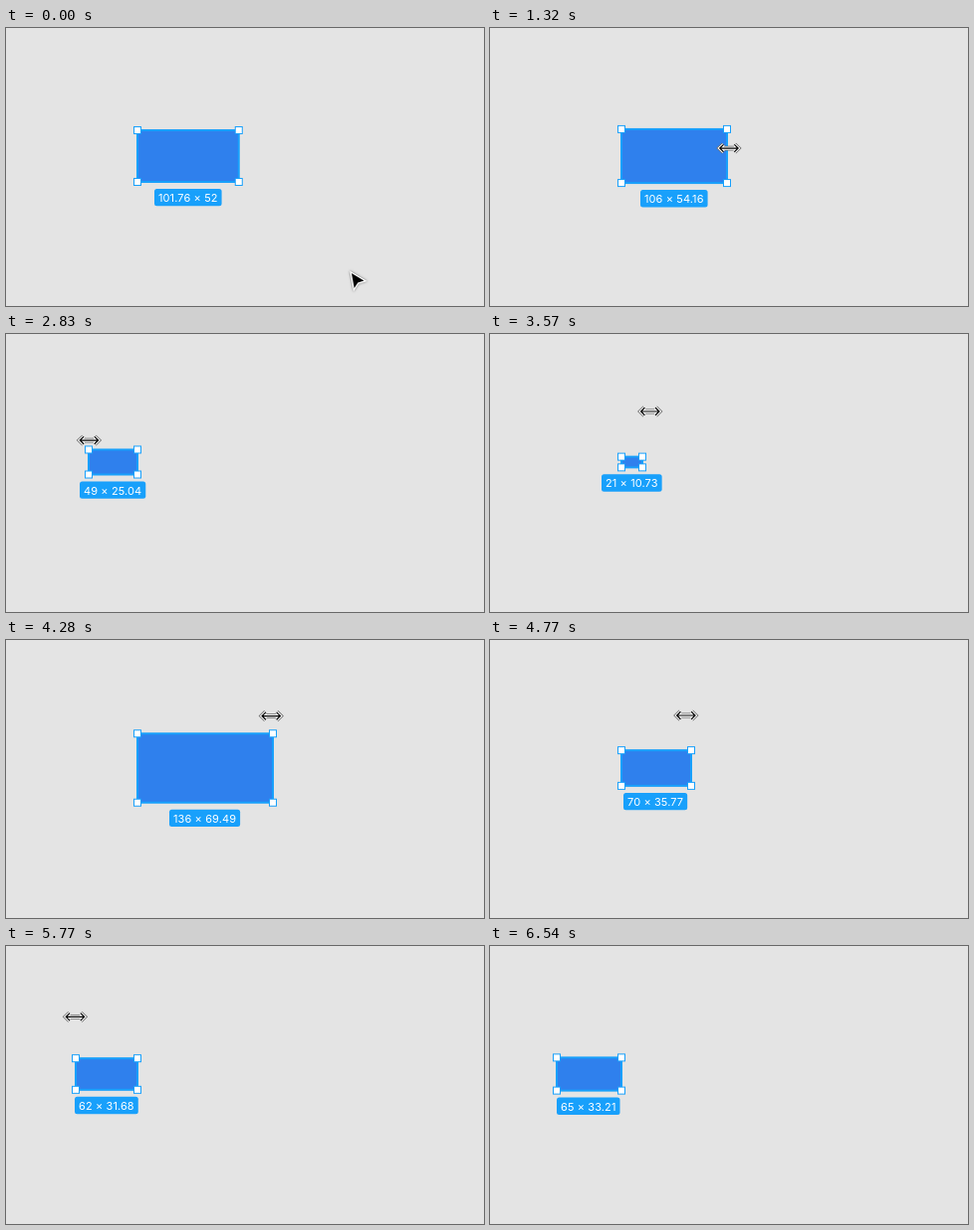
Recreate the animation shown at these times as an HTML page with a canvas. Size 480x280 px, loop 6.9 s.

```html
<!DOCTYPE html>
<html lang="en">
<head>
<meta charset="utf-8">
<title>Proportional resize</title>
<style>
  html, body { margin: 0; width: 480px; height: 280px; overflow: hidden; background: #e4e4e4; }
  canvas { display: block; }
</style>
</head>
<body>
<canvas id="stage" width="480" height="280"></canvas>
<script>
const ctx = document.getElementById('stage').getContext('2d');
const LOOP = 6900, STEP = 60, LEAD = 35;
const GRAB = 1140, RELEASE = 6060;
const ANCHOR = 132, MID = 129, RATIO = 0.51096;
const BLUE = '#18a0fb';

// Key points of the drag: time, signed width (negative is left of the anchor).
const widthKeys = [
  [GRAB, 101.76], [1400, 107.4], [1880, 42], [2100, 21], [2900, -50], [3160, -50],
  [3540, 21], [4190, 138.4], [4560, 98], [5280, -19], [5880, -65]
];
// time, pointer height during the drag
const heightKeys = [
  [GRAB, 122], [2100, 112], [2600, 112], [2900, 106], [3160, 106], [3540, 78], [5280, 75], [5880, 71]
];
// time, pointer x, pointer y
const approach = [[0, 347, 247], [180, 372, 264], [660, 226, 123], [900, 226, 123], [1020, 232, 122]];
const leave = [[RELEASE, 67, 71], [6540, 450, 302]];

// Smooth curve through the keys, level at every turning point.
function curve(keys, t, col = 1) {
  const last = keys.length - 1;
  if (t <= keys[0][0]) return keys[0][col];
  if (t >= keys[last][0]) return keys[last][col];
  const rate = i => (keys[i + 1][col] - keys[i][col]) / (keys[i + 1][0] - keys[i][0]);
  const slope = i => {
    if (i === 0 || i === last) return 0;
    const a = rate(i - 1), b = rate(i);
    return a * b > 0 ? 2 * a * b / (a + b) : 0;
  };
  const i = keys.findIndex(k => k[0] > t) - 1;
  const span = keys[i + 1][0] - keys[i][0], u = (t - keys[i][0]) / span;
  const from = keys[i][col], to = keys[i + 1][col];
  return from + (to - from) * u * u * (3 - 2 * u)
    + span * u * (1 - u) * (slope(i) * (1 - u) - slope(i + 1) * u);
}

function pointer(t) {
  if (t < GRAB) return [curve(approach, t, 1), curve(approach, t, 2)];
  if (t > RELEASE) return [curve(leave, t, 1), curve(leave, t, 2)];
  // The box lags slightly behind the hand.
  return [ANCHOR + 1 + curve(widthKeys, t + LEAD), curve(heightKeys, t)];
}

function drawBox(w) {
  const size = Math.max(1, Math.abs(w)), h = size * RATIO;
  const x = w < 0 ? ANCHOR - size : ANCHOR, y = MID - h / 2;
  ctx.fillStyle = '#2f80ed';
  ctx.fillRect(x, y, size, h);
  ctx.strokeStyle = BLUE;
  ctx.lineWidth = 2;
  ctx.strokeRect(x, y, size, h);

  for (const cx of [x, x + size]) {
    for (const cy of [y, y + h]) {
      ctx.fillStyle = BLUE;
      ctx.fillRect(cx - 4, cy - 4, 8, 8);
      ctx.fillStyle = '#fff';
      ctx.fillRect(cx - 3, cy - 3, 6, 6);
    }
  }
  drawLabel(`${+size.toFixed(2)} × ${+h.toFixed(2)}`, x + size / 2, y + h + 7);
}

function drawLabel(text, cx, top) {
  ctx.font = '11px Inter, "Open Sans", sans-serif';
  ctx.letterSpacing = '0.1px';
  const w = ctx.measureText(text).width + 8;
  const left = Math.floor(cx - w / 2);
  ctx.fillStyle = BLUE;
  ctx.beginPath();
  ctx.roundRect(left, top, w, 17.3, 2.5);
  ctx.fill();
  ctx.fillStyle = '#fff';
  ctx.fillText(text, left + 4, top + 13);
}

function drawArrow() {
  const shape = new Path2D('M0 0L12.5 7.6L6.3 9.4L2.7 15Z');
  ctx.shadowColor = 'rgba(0,0,0,.55)';
  ctx.shadowBlur = 2.5;
  ctx.strokeStyle = '#fff';
  ctx.lineWidth = 2.6;
  ctx.stroke(shape);
  ctx.shadowColor = 'transparent';
  ctx.fillStyle = '#000';
  ctx.fill(shape);
}

function drawResize() {
  const shape = new Path2D('M-8.5 0H8.5M-5.4 -3.7L-9.2 0L-5.4 3.7M5.4 -3.7L9.2 0L5.4 3.7');
  for (const [color, width] of [['#666', 4.8], ['#fff', 3.3], ['#000', 1.2]]) {
    ctx.strokeStyle = color;
    ctx.lineWidth = width;
    ctx.stroke(shape);
  }
}

function draw(t) {
  const q = Math.floor((t + 10) / STEP) * STEP;
  ctx.fillStyle = '#e4e4e4';
  ctx.fillRect(0, 0, 480, 280);

  const w = curve(widthKeys, q);
  drawBox(q > GRAB ? Math.round(w) : w);

  ctx.save();
  ctx.translate(...pointer(q));
  if (q >= 600 && q <= RELEASE) drawResize();
  else drawArrow();
  ctx.restore();
}

const start = performance.now();
function tick() {
  draw((performance.now() - start) % LOOP);
  requestAnimationFrame(tick);
}
tick();
</script>
</body>
</html>
```
